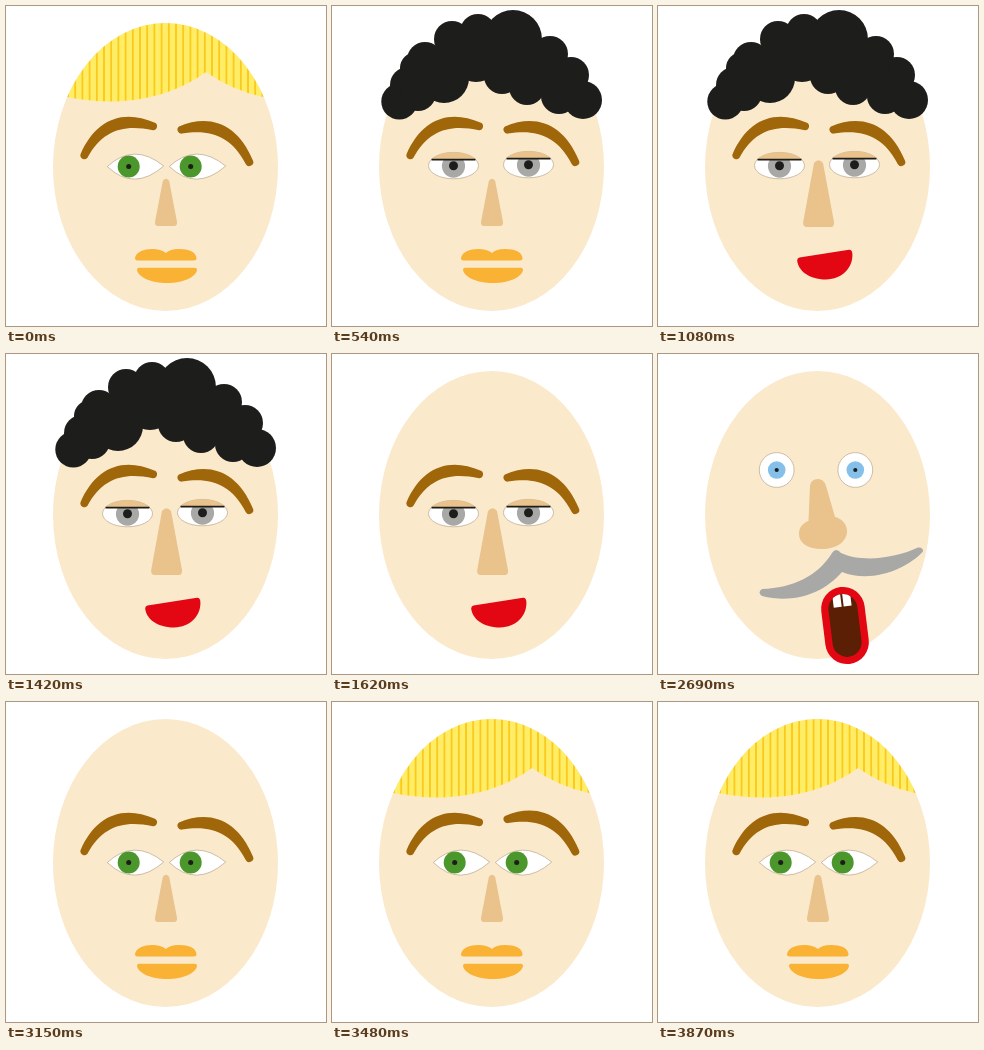
These frames come from a looping animation (320 px wide and 320 px high, 4000 ms). An HTML page:

```html
<!DOCTYPE html>
<html lang="en">
<head>
<meta charset="utf-8">
<title>Changing face</title>
<style>
  html, body { margin: 0; width: 100%; height: 100%; overflow: hidden; background: #fff; }
  svg { display: block; width: 100%; height: 100%; }
  .part { visibility: hidden; }
  .part.on { visibility: visible; }
  .eye { fill: #fff; stroke: #b9a58a; stroke-width: .7; }
  .skin { fill: #fbe9cc; }
  .tan { fill: #e9c28c; }
  .ink { fill: #1d1d1b; }
  .brow { fill: #a0660a; }
  .lips { fill: #f9b233; }
  .red { fill: #e30613; }
  .grey { fill: #a8a8a7; }
</style>
</head>
<body>
<svg viewBox="0 0 320 320">
  <defs>
    <pattern id="strands" x="61.1" width="7.2" height="320" patternUnits="userSpaceOnUse">
      <path fill="#ffed65" d="M0 0H8V320H0Z"/>
      <path fill="#fbc81e" d="M0 0H1.8V320H0Z"/>
    </pattern>
    <clipPath id="skull"><ellipse cx="159.5" cy="161" rx="112.5" ry="144"/></clipPath>
    <clipPath id="throat"><rect x="-14.5" y="-31.5" width="29" height="63" rx="14.5"/></clipPath>
    <clipPath id="lidClip"><path d="M-30 -20H30V-6H-30Z"/></clipPath>

    <g id="almond">
      <path class="eye" d="M101.3 160.5Q128 136 157.7 160Q128 186 101.3 160.5Z"/>
      <circle cx="122.7" cy="160.5" r="11" fill="#4b972b"/>
      <circle class="ink" cx="122.7" cy="160.5" r="2.5"/>
    </g>
    <g id="sleepy">
      <ellipse class="eye" rx="25" ry="13.2"/>
      <circle class="grey" cy=".5" r="11.6"/>
      <circle class="ink" cy=".2" r="4.5"/>
      <ellipse class="tan" rx="25" ry="13.4" clip-path="url(#lidClip)"/>
      <path d="M-22 -6H22" stroke="#1d1d1b" stroke-width="1.8"/>
    </g>
    <g id="shut">
      <ellipse class="tan" rx="25" ry="13.2"/>
      <path d="M-24.5 2Q-15 13 0 13T24.5 2" fill="none" stroke="#1d1d1b" stroke-width="1.8"/>
    </g>
    <g id="round">
      <circle class="eye" r="17.4"/>
      <circle r="8.8" fill="#84c0e9"/>
      <circle class="ink" r="2.1"/>
    </g>
  </defs>

  <ellipse class="skin" cx="159.5" cy="161" rx="112.5" ry="144"/>

  <g class="part" id="blond" clip-path="url(#skull)">
    <path fill="url(#strands)" d="M40 87L61 91C110 101 160 95 200 66Q225 84 257 91L290 96V0H40Z"/>
  </g>
  <g class="part ink" id="curls"></g>

  <g class="part" id="green">
    <use href="#almond"/><use href="#almond" x="62"/>
  </g>
  <g class="part" id="drowsy">
    <use href="#sleepy" x="121.5" y="159.6"/><use href="#sleepy" x="196.5" y="158.6"/>
  </g>
  <g class="part" id="blink">
    <use href="#shut" x="121.5" y="159.6"/><use href="#shut" x="196.5" y="158.6"/>
  </g>
  <g class="part" id="blue">
    <use href="#round" x="118.7" y="116"/><use href="#round" x="197.3" y="116"/>
  </g>

  <g class="part brow" id="brows">
    <path id="browL" d="M74.5 148.3C89.5 113.5 116.5 102.5 149 116.7A4 4 0 0 1 147 124.2C118.5 118 96.5 123.5 81.3 152A4 4 0 0 1 74.5 148.3Z"/>
    <path id="browR" d="M173 120.5C205 107 232 119 246.7 154A4 4 0 0 1 239.7 158C225 129 203 123 176 127.6A4 4 0 0 1 173 120.5Z"/>
  </g>

  <path class="part tan" id="small" d="M156.8 175Q160 170.5 163.2 175L171 216Q171.4 220 168 220H152Q148.6 220 149 216Z"/>
  <path class="part tan" id="wide" d="M156 157Q160.5 151.5 165 157L176 216Q176.4 221 173 221H149Q144.5 221 145.2 216Z"/>
  <path class="part tan" id="bulb" d="M152 132Q153 125 160 125Q166 125 168 132L177 163C183 164 189 170 189 177C189 188 178 195 164 195C150 195 141 189 141 180C141 173 145 169 150.5 167Z"/>

  <g class="part lips" id="pout">
    <path d="M129 252C130 246 138 243 146 243Q155 243 160 247Q164 243 173 243C183 243 190 246 190.5 252Q190.5 254.5 188 254.5H131.5Q129 254.5 129 252Z"/>
    <path d="M133 261.7H189Q191 261.7 191 264C190 271 177 277 161 277C145 277 132 271 131 264Q131 261.7 133 261.7Z"/>
  </g>
  <path class="part red" id="smile" d="M141.5 251.5L191 243.8Q194 243.5 194.4 248C195 262 184 273 168 273.5C150 273.5 140 264 139.2 254.5Q139.2 252 141.5 251.5Z"/>
  <g class="part" id="shout">
    <path class="grey" d="M104 235C135 234 160 222 174 199Q178 193 183 199C205 209 238 204 260 193.6Q265 193 265 197.5C250 214 215 230 184 218C165 240 135 250 104 242Q99 238.5 104 235Z"/>
    <g transform="translate(187 271.5) rotate(-7)">
      <rect class="red" x="-21.8" y="-38.7" width="43.6" height="77.4" rx="21.8"/>
      <g clip-path="url(#throat)">
        <path fill="#5a1f04" d="M-20 -40H20V40H-20Z"/>
        <path fill="#fff" d="M-9 -40H-1V-19H-9ZM1 -40H9V-19H1Z"/>
      </g>
    </g>
  </g>
</svg>
<script>
const LOOP = 4000;
const $ = id => document.getElementById(id);

// Centre and radius of each curl; most share one size.
const curls = [
  [67.3, 95.5], [76, 79], [84, 62, 16], [93, 54], [120, 33], [146, 26],
  [181, 33, 29], [218, 48], [239, 69], [251, 94, 19], [227, 90],
  [195, 81], [170, 70], [112, 72, 25], [86, 87], [144, 52, 24], [207, 62, 24]
];
$("curls").innerHTML = curls.map(([x, y, r = 18]) => `<circle cx="${x}" cy="${y}" r="${r}"/>`).join("");

// Each step lists only what changes at that time.
const steps = [
  [0, { hair: "blond", eyes: "green", brows: "brows", nose: "small", mouth: "pout", lift: "", flip: false }],
  [270, { hair: "curls" }],
  [540, { eyes: "drowsy" }],
  [810, { nose: "wide" }],
  [1080, { mouth: "smile" }],
  [1350, { eyes: "blink" }],
  [1420, { eyes: "drowsy" }],
  [1550, { eyes: "blink" }],
  [1620, { eyes: "drowsy", hair: "" }],
  [1890, { eyes: "blue", brows: "" }],
  [2160, { nose: "bulb" }],
  [2430, { mouth: "shout" }],
  [2560, { flip: true }],
  [2690, { flip: false }],
  [2820, { flip: true }],
  [2950, { mouth: "pout", flip: false }],
  [3080, { nose: "small" }],
  [3150, { eyes: "green", brows: "brows" }],
  [3220, { hair: "blond" }],
  [3350, { lift: "L" }],
  [3480, { lift: "R" }],
  [3610, { lift: "L" }],
  [3740, { lift: "R" }],
  [3870, { lift: "" }]
];

const parts = [...document.querySelectorAll(".part")];
const raise = up => `translate(0 ${up ? -6.5 : 0})`;

function draw(time) {
  const face = {};
  for (const [at, change] of steps) if (at <= time) Object.assign(face, change);
  const shown = [face.hair, face.eyes, face.brows, face.nose, face.mouth];
  parts.forEach(p => p.classList.toggle("on", shown.includes(p.id)));
  $("browL").setAttribute("transform", raise(face.lift === "L"));
  $("browR").setAttribute("transform", raise(face.lift === "R"));
  $("shout").setAttribute("transform", face.flip ? "matrix(-1 0 0 1 355.5 0)" : "translate(0 0)");
}

const start = performance.now();
function tick() {
  draw((performance.now() - start) % LOOP);
  requestAnimationFrame(tick);
}
tick();
</script>
</body>
</html>
```
